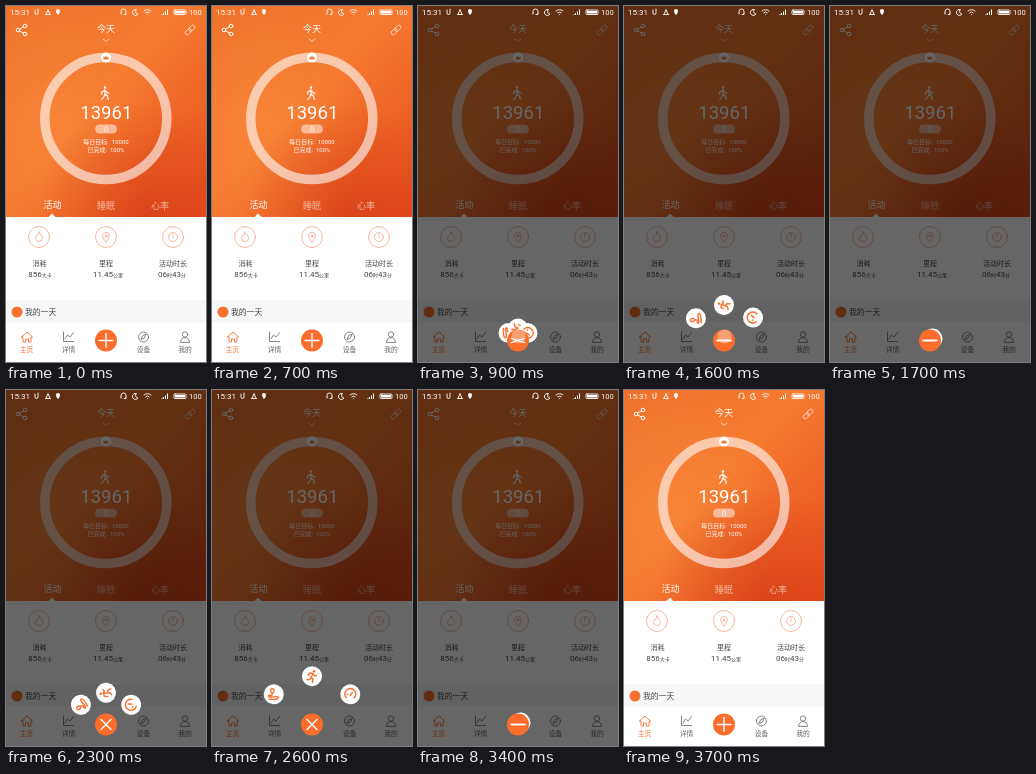
An HTML page for the animation above (3800 ms loop, 200x356 px).

```html
<!DOCTYPE html>
<html lang="zh">
<head>
<meta charset="utf-8">
<style>
html, body { margin: 0; width: 100%; height: 100%; overflow: hidden; background: #fff; }
svg { display: block; width: 100%; height: 100%; }
text { font-family: Roboto, "Noto Sans CJK SC", "Noto Sans CJK", sans-serif; }
.line { fill: none; stroke-linecap: round; stroke-linejoin: round; }
.mid { text-anchor: middle; }
</style>
</head>
<body>
<svg viewBox="0 0 200 356">
  <defs>
    <linearGradient id="sky" x1="0" y1="0" x2="1" y2="1">
      <stop offset="0" stop-color="#ee702a"/>
      <stop offset=".45" stop-color="#f67a30"/>
      <stop offset="1" stop-color="#e64c1c"/>
    </linearGradient>
    <radialGradient id="glow" cx=".2" cy=".55" r=".6">
      <stop offset="0" stop-color="#ff9a4a" stop-opacity=".35"/>
      <stop offset="1" stop-color="#ff9a4a" stop-opacity="0"/>
    </radialGradient>
    <radialGradient id="shade" cx=".7" cy="1" r=".55">
      <stop offset="0" stop-color="#cf3812" stop-opacity=".6"/>
      <stop offset="1" stop-color="#cf3812" stop-opacity="0"/>
    </radialGradient>
  </defs>

  <rect width="200" height="356" fill="#fff"/>
  <rect width="200" height="211" fill="url(#sky)"/>
  <rect width="200" height="211" fill="url(#glow)"/>
  <rect width="200" height="211" fill="url(#shade)"/>

  <g class="line" stroke="#fff">
    <path d="M19 20l-7 4 7 4"/>
    <g fill="#f27830"><circle cx="19" cy="20" r="1.8"/><circle cx="12" cy="24" r="1.8"/><circle cx="19" cy="28" r="1.8"/></g>
    <g transform="translate(184 24) rotate(-45)" stroke-width=".9" opacity=".7">
      <rect x="-6" y="-2" width="7" height="4" rx="2"/><rect x="-1" y="-2" width="7" height="4" rx="2"/>
    </g>
    <path d="M97 33l3 2.400 3-2.400" stroke-width=".8" opacity=".8"/>
    <circle cx="99.800" cy="112.600" r="61" stroke-width="9.500" opacity=".6"/>
    <g transform="translate(99 87)" stroke-width="1.200">
      <circle cx="0" cy="-5.500" r="1.200" fill="#fff" stroke="none"/>
      <path d="M0-3v4l2.500 2 .8 3.500M0 1l-1.200 3-2 2.500M0-3l-3 2-.5 2M0-3l2 2.600 2 .6"/>
    </g>
  </g>
  <circle cx="100" cy="51.500" r="5" fill="#fff"/>
  <path d="M97.500 53.500v-3.200l1.400 1.100 1.100-2 1.100 2 1.400-1.100v3.200z" fill="#f47a30"/>
  <rect x="89" y="118.500" width="22" height="9" rx="4.500" fill="#fff" opacity=".5"/>
  <path class="line" d="M100 120.500c3 2.500 2 5 0 5s-2.500-2 0-5" stroke="#fff" stroke-width=".7"/>
  <g fill="#fff" class="mid">
    <text x="100" y="26" font-size="9">今天</text>
    <text x="100.300" y="113" font-size="18.500">13961</text>
    <text x="100" y="137.500" font-size="6">每日目标:&#160; 10000</text>
    <text x="100" y="146" font-size="6">已完成:&#160; 100%</text>
    <text x="46.500" y="202" font-size="9">活动</text>
    <g opacity=".6"><text x="100" y="203" font-size="9">睡眠</text><text x="154" y="203" font-size="9">心率</text></g>
  </g>
  <path d="M42 211.500l4-4 4 4z" fill="#fff"/>

  <g class="line" stroke="#f79a78" stroke-width=".7">
    <circle cx="33" cy="231" r="10.500"/><circle cx="100" cy="231" r="10.500"/><circle cx="167" cy="231" r="10.500"/>
    <path d="M33 226c1 2 3.500 3.500 3.500 6.500a3.500 3 0 0 1-7 0c0-2 1-2 1.500-3.500 1 1 2-1 2-3z"/>
    <path d="M100 236c-5-5-4-9.500 0-9.500s5 4.500 0 9.500z"/><circle cx="100" cy="230" r="1"/>
    <circle cx="167" cy="231" r="4.500"/><path d="M167 228v3.500"/>
  </g>
  <g class="mid" fill="#444">
    <g font-size="7"><text x="33.500" y="260">消耗</text><text x="100" y="260">里程</text><text x="167" y="260">活动时长</text></g>
    <g font-size="8">
      <text x="34" y="271">856<tspan font-size="5">大卡</tspan></text>
      <text x="102" y="271">11.45<tspan font-size="5">公里</tspan></text>
      <text x="166" y="271">06<tspan font-size="5">时</tspan>43<tspan font-size="5">分</tspan></text>
    </g>
  </g>
  <rect y="294" width="200" height="24" fill="#f7f7f7"/>
  <circle cx="11" cy="306" r="5.500" fill="#f9702c"/>
  <text x="19" y="309" font-size="7.800" fill="#444">我的一天</text>

  <rect y="315" width="200" height="41" fill="#fff"/>
  <path d="M0 315.500h200" stroke="#eee" stroke-width=".7"/>
  <g class="line" stroke="#777" stroke-width=".9">
    <path d="M15.500 331l5.500-5 5.500 5h-1.500v5h-2.500v-3h-3v3h-2.500v-5z" stroke="#f9702c"/>
    <path d="M57.500 326v9.500h10M59 333l2.500-4 2.500 2 3.500-4.500"/>
    <circle cx="137.500" cy="331" r="5"/><path d="M140 328.500l-1.500 3.500-3.500 1.500 1.500-3.500z"/>
    <circle cx="179" cy="328.500" r="2.700"/><path d="M174.500 336c0-6 9-6 9 0z"/>
  </g>
  <g class="mid" font-size="6.800" fill="#666">
    <text x="20.500" y="345.500" fill="#f9702c">主页</text><text x="62.500" y="345.500">详情</text>
    <text x="137.500" y="345.500">设备</text><text x="179" y="345.500">我的</text>
  </g>

  <rect id="dim" width="200" height="356"/>

  <g fill="#fff">
    <text x="4" y="9" font-size="8">15:31</text>
    <text x="183" y="9" font-size="7.500">100</text>
    <path d="M52 3a2 2 0 0 1 2 2c0 2-2 4-2 4s-2-2-2-4a2 2 0 0 1 2-2zM159 9V5.500h1V9zM157 9V7h1v2zM155.500 9V8h1v1zM161 9V3.500h1V9z"/>
    <g class="line" stroke="#fff" stroke-width=".9">
      <path d="M29 4v3a1.500 1.500 0 0 0 3 0V3M40 8.500l2-5 2 5M39.500 8.500h5M115 7V5.500a2.500 2.500 0 0 1 5 0V7M115 7v1M120 7v1.500h-2M130 3.500a3 3 0 1 0 2 4.500c-2 0-3-2-2-4.500M138 5a5 5 0 0 1 7 0M139.700 6.800a2.600 2.600 0 0 1 3.600 0M141.500 8.600v0"/>
      <rect x="168" y="4" width="12" height="4.500" rx="1"/>
    </g>
    <rect x="169" y="5" width="10" height="2.500"/>
  </g>

  <g id="items" class="line" stroke="#f9702c" stroke-width="1.400">
    <g><circle r="10" fill="#fff" stroke="none"/>
      <path d="M-1.500-.5c-2.500-2.500-2-5 0-5s2.500 2.500 0 5z"/><path d="M-1.500 1c-6 0-4 2.300 0 1.700s7-1 6 1-6 1.300-9 1.300"/></g>
    <g><circle r="10" fill="#fff" stroke="none"/><circle cx="1.800" cy="-5" r="1.300" fill="#f9702c" stroke="none"/>
      <path d="M-4-.5l1.700-2.600 3.200.4-1.700 3.800 2 1.900-.5 3.200M-.8 1l-1 2.200-3 .6M.9-2.700l1.500 2.300 2-.4"/></g>
    <g><circle r="10" fill="#fff" stroke="none"/>
      <path d="M-4 3.500a5.500 5.500 0 1 1 8 0M0 1l2-3M-3 0h.5"/></g>
  </g>
  <g transform="translate(100 334.500)">
    <circle r="11" fill="#fb6d2c"/>
    <circle id="touch" cx=".5" cy="-4" r="7" fill="#fff" opacity=".35"/>
    <g class="line" stroke="#fff" stroke-width="1.400"><path id="barA" d="M-7 0h14"/><path id="barB" d="M-7 0h14"/></g>
  </g>
</svg>
<script>
const LOOP = 3800, DIM = .6;
const cycles = [{ open: 800, close: 1500 }, { open: 2150, close: 3200 }];
const spots = [[-38, -30], [0, -48], [38, -30]];
const $ = id => document.getElementById(id);
const items = [...$('items').children];
const ramp = (t, a, b) => Math.min(1, Math.max(0, (t - a) / (b - a)));
const backOut = p => 1 + 2.7 * (p - 1) ** 3 + 1.7 * (p - 1) ** 2;
const within = (t, a, b) => t >= a && t < b;
const show = (el, on) => el.setAttribute('visibility', on ? 'visible' : 'hidden');

function draw(t) {
  const cycle = t < cycles[1].open ? cycles[0] : cycles[1];
  const up = t - cycle.open, down = t - cycle.close;

  // The bars go plus, minus, cross, then back the same way.
  const cross = 45 * ramp(up, 70, 150) * (1 - ramp(down, 0, 90));
  const plus = 90 * (down < 0 ? 1 - ramp(up, 0, 60) : ramp(down, 230, 350));
  $('barA').setAttribute('transform', `rotate(${cross})`);
  $('barB').setAttribute('transform', `rotate(${plus - cross})`);
  $('dim').setAttribute('opacity', DIM * ramp(up, 55, 100) * (1 - ramp(down, 250, 450)));
  show($('touch'), within(up, 20, 130) || within(down, 0, 150));

  items.forEach((item, i) => {
    const [x, y] = spots[i];
    const lag = i === 2 ? 10 : 0;
    const reach = down < 0 ? backOut(ramp(up, 78, 478)) : 1 - ramp(down, 0, 198 + lag) ** 2;
    show(item, reach > 0);
    item.setAttribute('transform',
      `translate(${100 + x * reach} ${334.5 + y * reach}) rotate(${-360 * (1 - reach)})`);
  });
}

const start = performance.now();
function tick() {
  draw((performance.now() - start) % LOOP);
  requestAnimationFrame(tick);
}
tick();
</script>
</body>
</html>
```
